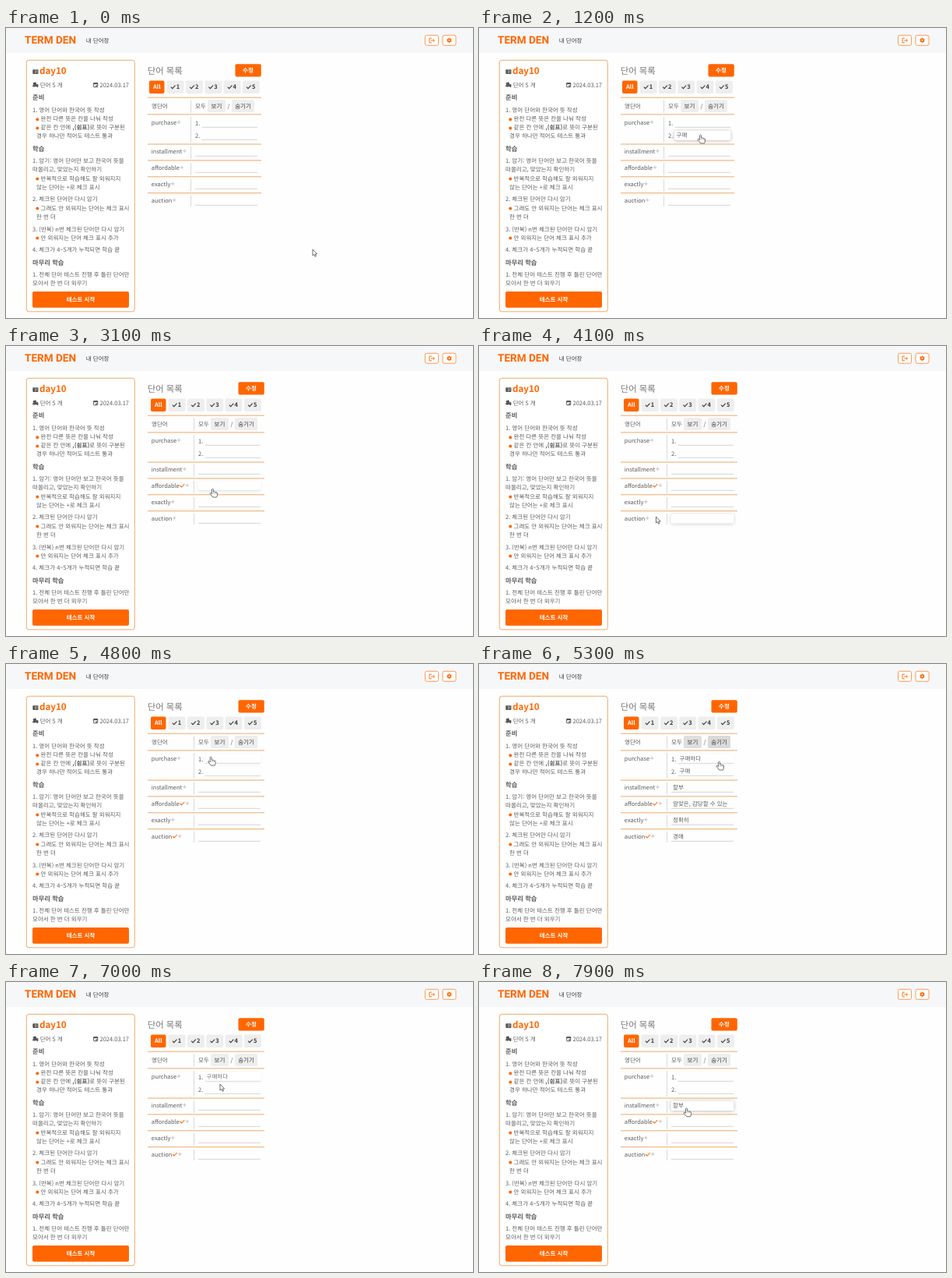
An HTML page with a canvas for the animation above (8000 ms loop, 600x372 px).

```html
<!DOCTYPE html>
<html lang="ko">
<head>
<meta charset="utf-8">
<title>단어장</title>
<style>
html, body { margin: 0; width: 100%; height: 100%; overflow: hidden; background: #fefefe; }
canvas { display: block; width: 600px; height: 372px; }
</style>
</head>
<body>
<canvas id="stage"></canvas>
<script>
const W = 600, H = 372, LOOP = 8000, STEP = 100;
const ORANGE = '#ff6600', INK = '#5c5c5c', DARK = '#3a3a3a', LINE = '#f0a868';
const KR = '"Noto Sans CJK KR", "Noto Sans CJK", "Noto Sans CJK JP", sans-serif';
const canvas = document.getElementById('stage');
const ctx = canvas.getContext('2d');
const ratio = window.devicePixelRatio || 1;
canvas.width = W * ratio;
canvas.height = H * ratio;

// Pointer path: time, x, y
const path = [
  [0, 394, 284], [100, 352, 216], [200, 304, 144], [300, 286, 123], [700, 286, 124],
  [850, 284, 134], [1200, 284, 137], [1400, 281, 141], [1600, 270, 156], [1800, 250, 163],
  [2000, 231, 175], [2200, 226, 179], [2900, 226, 178], [3050, 243, 180], [3100, 265, 183],
  [3400, 266, 182], [3550, 268, 200], [3700, 268, 206], [3930, 264, 215], [4070, 247, 219],
  [4100, 227.5, 219], [4300, 216, 220], [4550, 216, 220], [4850, 272, 99], [5000, 273, 99],
  [5100, 303, 100], [5200, 307, 105], [5260, 308, 114], [5300, 308, 125], [5800, 308, 124],
  [6000, 307, 101], [6400, 307, 100], [6600, 288, 119], [6780, 276, 126], [6820, 275.5, 128.6],
  [7000, 275, 131], [7150, 274, 136], [7350, 272, 140], [7500, 269, 153], [7700, 266, 161],
  [8000, 266, 162]
];
const MARK_A = 2600, MARK_B = 4400, SHOW = 4950, HIDE = 6200;

const words = [
  { name: 'purchase', y: 122 },
  { name: 'installment', y: 159 },
  { name: 'affordable', y: 180, marked: MARK_A },
  { name: 'exactly', y: 201 },
  { name: 'auction', y: 222, marked: MARK_B }
];
const rowTops = [89.2, 110.9, 149, 169.9, 190.8, 211.7, 231];
const fields = [
  { y: 122, text: '구매하다', num: '1.' },
  { y: 138, text: '구매', num: '2.' },
  { y: 159, text: '할부' },
  { y: 180, text: '알맞은, 감당할 수 있는' },
  { y: 201, text: '정확히' },
  { y: 222, text: '경매' }
];
// Guide text: x, y, text, bullet
const guide = [
  [34, 105, '1. 영어 단어와 한국어 뜻 작성'],
  [44.5, 116.5, '완전 다른 뜻은 칸을 나눠 작성', 1],
  [39, 138.6, '경우 하나만 적어도 테스트 통과'],
  [34, 170.6, '1. 암기: 영어 단어만 보고 한국어 뜻을'],
  [34, 181.6, '떠올리고, 맞았는지 확인하기'],
  [44.5, 192.8, '반복적으로 학습해도 잘 외워지지', 1],
  [39, 204, '않는 단어는 +로 체크 표시'],
  [34, 219.5, '2. 체크된 단어만 다시 암기'],
  [44.5, 230.8, '그래도 안 외워지는 단어는 체크 표시', 1],
  [39, 242, '한 번 더'],
  [34, 257.8, '3. (반복) n번 체크된 단어만 다시 암기'],
  [44.5, 268.8, '안 외워지는 단어 체크 표시 추가', 1],
  [34, 284.6, '4. 체크가 4~5개가 누적되면 학습 끝'],
  [34, 316.3, '1. 전체 단어 테스트 진행 후 틀린 단어만'],
  [34, 327.5, '모아서 한 번 더 외우기']
];

function label(text, x, y, { size = 7.5, weight = 400, color = INK, align = 'left', family = KR } = {}) {
  ctx.font = `${weight} ${size}px ${family}`;
  ctx.fillStyle = color;
  ctx.textAlign = align;
  ctx.fillText(text, x, y + size * 0.37);
  return ctx.measureText(text).width;
}

function box(x, y, w, h, r, fill, stroke) {
  ctx.beginPath();
  ctx.roundRect(x, y, w, h, r);
  if (fill) { ctx.fillStyle = fill; ctx.fill(); }
  if (stroke) { ctx.strokeStyle = stroke; ctx.lineWidth = 1; ctx.stroke(); }
}

function dot(x, y, r, color) {
  ctx.beginPath();
  ctx.arc(x, y, r, 0, Math.PI * 2);
  ctx.fillStyle = color;
  ctx.fill();
}

function rule(points, color, width = 1) {
  ctx.beginPath();
  points.forEach(([x, y]) => ctx.lineTo(x, y));
  ctx.strokeStyle = color;
  ctx.lineWidth = width;
  ctx.stroke();
}

function tick(x, y, color, width) {
  rule([[x - 2.8, y], [x - 0.9, y + 2], [x + 2.8, y - 2]], color, width);
}

function pointer(t) {
  const i = Math.max(1, path.findIndex(p => p[0] >= t));
  const [t0, x0, y0] = path[i - 1], [t1, x1, y1] = path[i];
  const k = Math.max(0, (t - t0) / (t1 - t0));
  return { x: x0 + (x1 - x0) * k, y: y0 + (y1 - y0) * k };
}

const shift = t => t >= MARK_A ? 4 : 0;
const fieldX = (f, t) => 243 + shift(t) + (f.num ? 8.5 : 0);

function inside(t, x, y, w, h) {
  const p = pointer(Math.max(0, t));
  return p.x >= x && p.x < x + w && p.y >= y && p.y < y + h;
}

const onField = (f, t) => inside(t, fieldX(f, t), f.y - 6.5, 323 + shift(t) - fieldX(f, t), 13);
const onShow = t => inside(t, 259 + shift(t), 92, 23, 16);
const onHide = t => inside(t, 290 + shift(t), 92, 29, 16);

// Share of the given time span during which the test held
function share(test, from, to) {
  const n = 8;
  let hits = 0;
  for (let i = 0; i < n; i++) hits += test(from + (to - from) * (i + 0.5) / n);
  return hits / n;
}

function drawHeader() {
  ctx.fillStyle = '#f6f7f9';
  ctx.fillRect(0, 0, W, 32);
  label('TERM DEN', 24, 15.4, { size: 13.6, weight: 700, color: ORANGE, family: 'Roboto, sans-serif' });
  label('내 단어장', 102.8, 15.8, { weight: 500, color: DARK });
  box(538.5, 9.3, 17, 13, 2, '#fff', '#ff9a55');
  box(561, 9.3, 17, 13, 2, '#fff', '#ff9a55');
  rule([[547, 13.2], [544, 13.2], [544, 18.8], [547, 18.8]], ORANGE, 0.9);
  rule([[546, 16], [550.3, 16]], ORANGE, 0.9);
  rule([[548.6, 14.2], [550.5, 16], [548.6, 17.8]], ORANGE, 0.9);
  for (let i = 0; i < 3; i++) {
    const a = Math.PI / 6 + i * Math.PI / 3, c = Math.cos(a) * 3.1, s = Math.sin(a) * 3.1;
    rule([[569.5 - c, 15.8 - s], [569.5 + c, 15.8 + s]], ORANGE, 1.7);
  }
  dot(569.5, 15.8, 2.4, ORANGE);
  dot(569.5, 15.8, 1, '#fff');
}

function drawIcons() {
  const gray = '#555';
  box(34.3, 53.3, 7.2, 5.6, 0.8, gray);
  rule([[37.9, 53.6], [37.9, 58.6]], '#fff', 0.6);
  rule([[38.8, 55], [40.7, 55]], '#ddd', 0.5);
  rule([[38.8, 56.6], [40.7, 56.6]], '#ddd', 0.5);
  ctx.save();
  ctx.translate(37.3, 72.6);
  ctx.rotate(-0.35);
  box(-2, -2.9, 4, 5.6, 0.7, gray);
  ctx.restore();
  box(39.2, 72, 2.2, 4, 0.7, gray);
  box(34.3, 73, 1.6, 2.6, 0.6, gray);
  box(112.7, 70.6, 5, 5.2, 0.5, '#fff', gray);
  ctx.fillStyle = gray;
  ctx.fillRect(112.3, 70.3, 5.8, 1.8);
  ctx.fillRect(115.2, 73.4, 1.6, 1.6);
}

function drawCard() {
  box(26.3, 41.3, 139, 322.5, 3, '#fff', LINE);
  drawIcons();
  label('day10', 43, 54.8, { size: 11.6, weight: 700, color: ORANGE });
  label('단어 5 개', 43.7, 72.8);
  label('2024.03.17', 158, 72.8, { align: 'right' });
  [['준비', 89], ['학습', 154.6], ['마무리 학습', 300.5]].forEach(([text, y]) =>
    label(text, 34, y, { size: 8.3, weight: 700, color: INK }));
  guide.forEach(([x, y, text, bullet]) => {
    if (bullet) dot(40.3, y + 0.8, 2, ORANGE);
    label(text, x, y);
  });
  dot(40.3, 128.5, 2, ORANGE);
  let x = 44.5;
  [['같은 칸 안에 ', 400], [',(쉼표)', 700], ['로 뜻이 구분된', 400]].forEach(([text, weight]) => {
    x += label(text, x, 127.7, { weight });
  });
  box(34, 338, 124, 20.8, 2, ORANGE);
  label('테스트 시작', 96, 348.4, { weight: 700, color: '#fff', align: 'center' });
}

function drawToolbar(t, dx) {
  label('단어 목록', 181.7, 54.8, { size: 11.4, weight: 300, color: '#777' });
  box(294.5 + dx, 46.2, 33.3, 16.2, 2, ORANGE);
  label('수정', 311 + dx, 54.3, { weight: 700, color: '#fff', align: 'center' });
  const x0 = 184 + dx / 2;
  box(x0, 67.5, 19.5, 16.5, 2, ORANGE);
  label('All', x0 + 9.8, 75.6, { weight: 700, color: '#fff', align: 'center' });
  for (let i = 1; i <= 5; i++) {
    const x = x0 - 1.6 + i * 24.3;
    box(x, 67.5, 22, 16.5, 2, '#eeeeee');
    tick(x + 8, 75.7, DARK, 1.1);
    label(String(i), x + 12, 75.7, { weight: 700, color: DARK });
  }
}

function toggle(text, x, w, dark) {
  const c = Math.round(238 - 20 * Math.min(1, dark * 2));
  box(x, 92, w, 16, 2, `rgb(${c},${c},${c})`);
  label(text, x + w / 2, 99.8, { color: DARK, align: 'center' });
}

function drawWord({ name, y, marked = Infinity }, t) {
  let x = 187 + label(name, 186.8, y - 0.5) + 2.8;
  if (t >= marked) {
    tick(x + 0.6, y - 1, ORANGE, 1.1);
    x += 7;
  }
  rule([[x - 2.3, y - 1.2], [x + 2.3, y - 1.2]], '#c8c8d0', 1.1);
  rule([[x, y - 3.5], [x, y + 1.1]], '#c8c8d0', 1.1);
}

function drawField(f, t, dx) {
  const x = fieldX(f, t), end = 323 + dx;
  const hover = share(s => onField(f, s), t - 200, t);
  const late = share(s => onField(f, s), t - 350, t - 150);
  const shown = t >= SHOW && t < HIDE ? 1 : late;
  if (f.num) label(f.num, 243 + dx, f.y);
  if (hover) {
    ctx.shadowColor = `rgba(0,0,0,${0.3 * hover})`;
    ctx.shadowBlur = 4 * ratio;
    ctx.shadowOffsetY = 0.6 * ratio;
    box(x - 0.5, f.y - 6.5, end - x + 1, 12.5, 2, '#fff');
    ctx.shadowColor = 'transparent';
  }
  ctx.globalAlpha = 1 - hover;
  rule([[x, f.y + 5.3], [end, f.y + 5.3]], '#d4d4d8');
  ctx.globalAlpha = shown;
  label(f.text, x + 2, f.y - 0.3);
  ctx.globalAlpha = 1;
}

function drawTable(t, dx) {
  const right = 328 + dx, mid = 237.6 + dx;
  rowTops.slice(0, -1).forEach((y, i) => {
    rule([[182, y], [right, y]], LINE);
    rule([[mid, y + 3], [mid, rowTops[i + 1] - 2]], '#d8d8dc');
  });
  label('영단어', 187, 99.8);
  label('모두', 243 + dx, 99.8);
  toggle('보기', 259 + dx, 23, share(onShow, t - 400, t));
  label('/', 286 + dx, 99.8, { align: 'center' });
  toggle('숨기기', 290 + dx, 29, share(onHide, t - 300, t));
  words.forEach(w => drawWord(w, t));
  fields.forEach(f => drawField(f, t, dx));
}

function drawPointer(t) {
  const { x, y } = pointer(t);
  const onPlus = inside(t, 222, 174, 9, 9) || inside(t, 212, 216, 8, 9);
  const hand = onPlus || onShow(t) || onHide(t) || fields.some(f => onField(f, t));
  const shape = hand
    ? 'M-1 .8Q0-.8 1 .8V4Q2 3.2 2.7 4.3Q3.8 3.6 4.4 4.8Q5.8 4.4 6 6V8Q6 9.3 5 11H.3L-3.4 6.5Q-3.4 5.2-2.2 5.5L-1 6.7Z'
    : 'M0 0V8L1.9 6.4L3.1 9.2L4.5 8.6L3.3 5.9H5.7Z';
  const p = new Path2D(shape);
  ctx.save();
  ctx.translate(x + (hand ? 0.5 : 0), y);
  ctx.fillStyle = '#fff';
  ctx.strokeStyle = '#555';
  ctx.lineWidth = 0.85;
  ctx.lineJoin = 'round';
  ctx.fill(p);
  ctx.stroke(p);
  if (hand) [1.2, 2.8, 4.3].forEach(gx => rule([[gx, 4.6], [gx, 6.6]], '#777', 0.5));
  ctx.restore();
}

function frame(now) {
  const t = Math.floor((now % LOOP) / STEP) * STEP;
  const dx = shift(t);
  ctx.setTransform(ratio, 0, 0, ratio, 0, 0);
  ctx.textRendering = 'geometricPrecision';
  ctx.fillStyle = '#fefefe';
  ctx.fillRect(0, 0, W, H);
  drawHeader();
  drawCard();
  drawToolbar(t, dx);
  drawTable(t, dx);
  drawPointer(t);
}

let start;
function play(now) {
  start ??= now;
  frame(now - start);
  requestAnimationFrame(play);
}
requestAnimationFrame(play);
</script>
</body>
</html>
```
